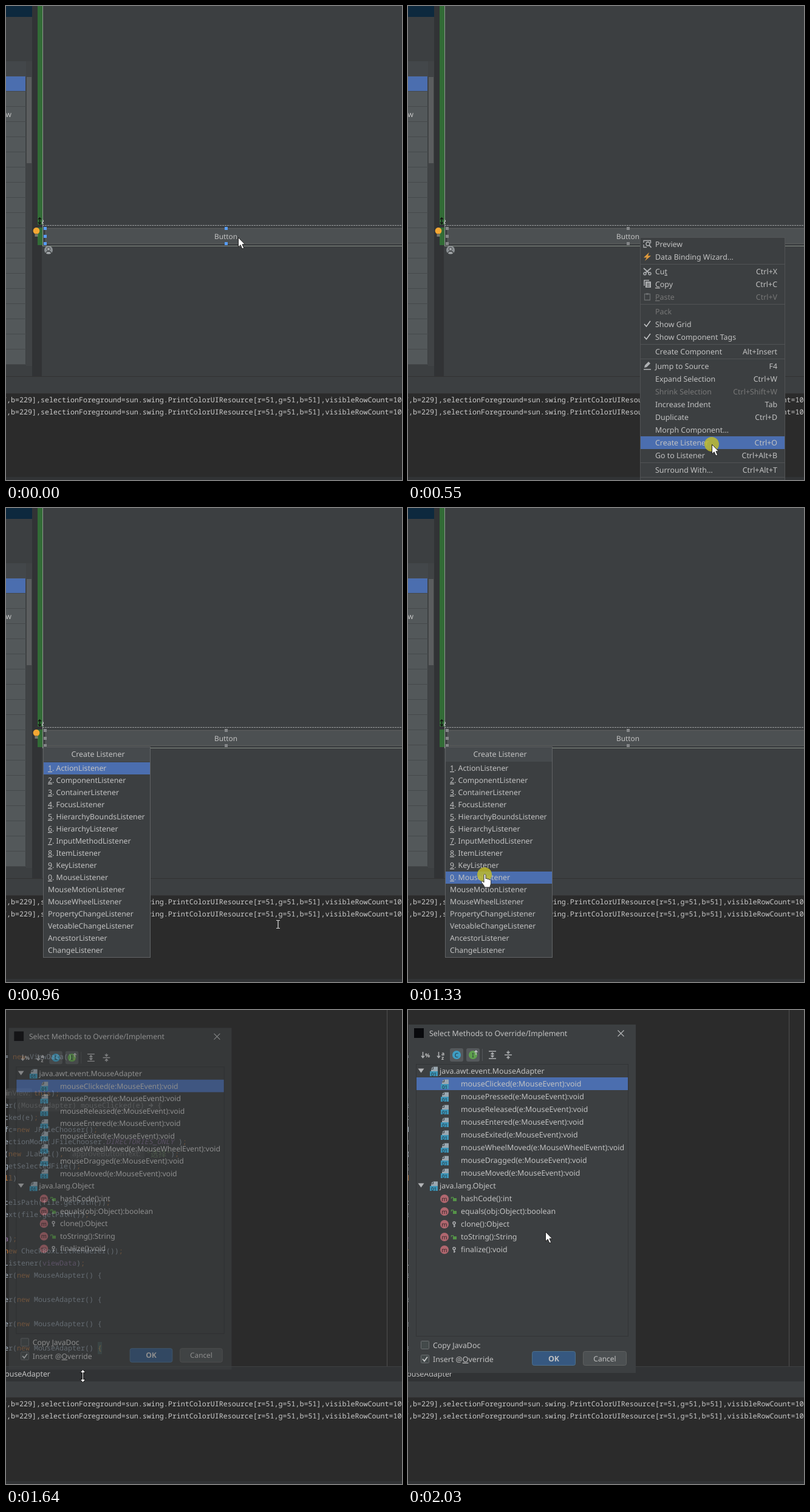
Write an HTML page that moves like this. It is 652x781 px and loops after 2110 ms.

```html
<!DOCTYPE html>
<html lang="en">
<head>
<meta charset="utf-8">
<title>Create listener</title>
<style>
  html, body { margin: 0; width: 100%; height: 100%; overflow: hidden; background: #3c3f41; }
  svg { display: block; }
  text { font: 12.4px "Noto Sans", "Open Sans", sans-serif; fill: #c2c2c2; white-space: pre; text-rendering: geometricPrecision; }
  text.code { font: 11.67px "Noto Sans Mono", "DejaVu Sans Mono", monospace; fill: #b0becd; }
  text.cjk { font: 13px "Noto Sans CJK SC", "Noto Sans CJK", sans-serif; fill: #6a8759; }
  .u { text-decoration: underline; }
</style>
</head>
<body>
<svg id="stage" width="652" height="781" viewBox="0 0 652 781"></svg>
<script>
const LOOP = 2110;
const BG = '#3c3f41', DARK = '#2b2b2b', BLUE = '#4b6eaf', GREY = '#afb1b3';

function el(tag, attrs, parent) {
  const e = document.createElementNS('http://www.w3.org/2000/svg', tag);
  for (const k in attrs) e.setAttribute(k, attrs[k]);
  parent.appendChild(e);
  return e;
}
const group = (parent = stage) => el('g', {}, parent);
const rect = (g, x, y, width, height, fill, more = {}) => el('rect', { x, y, width, height, fill, ...more }, g);
const frame = (g, x, y, w, h, fill, stroke, rx = 0) => rect(g, x + .5, y + .5, w - 1, h - 1, fill, { stroke, rx });
const path = (g, d, stroke, fill = 'none', width = 1.3) => el('path', { d, stroke, fill, 'stroke-width': width }, g);
const disc = (g, cx, cy, r, fill) => el('circle', { cx, cy, r, fill }, g);
const at = (g, x, y) => el('g', { transform: `translate(${x} ${y})` }, g);

// "_" marks the underlined mnemonic; y is the middle of the line
function label(g, x, y, str, style = '', anchor = 'start') {
  const t = el('text', { x, y: y + 4.5, style, 'text-anchor': anchor }, g);
  str.split(/(_.)/).forEach(part => {
    const key = part[0] === '_';
    if (part) el('tspan', key ? { class: 'u' } : {}, t).textContent = key ? part[1] : part;
  });
  return t;
}

const TOKENS = /(\bnew\b|\bthis\b|^ll|[;,]|DIRECTORIES_ONLY|viewData|^a\b)/;
function code(g, x, y, str, plain) {
  const t = el('text', { x, y: y + 4, class: 'code' }, g);
  if (plain) { t.style.fill = plain; t.textContent = str; return; }
  str.split(TOKENS).forEach((part, i) => {
    if (!part) return;
    const s = el('tspan', {}, t);
    s.textContent = part;
    if (i % 2) s.style.fill = /^(a|viewData|DIR.*)$/.test(part) ? '#9876aa' : '#cc7832';
    if (part.startsWith('DIR')) s.style.fontStyle = 'italic';
  });
}

// ---- form designer ----
const design = group();
rect(design, 0, 0, 652, 781, BG);
rect(design, 0, 0, 43, 18, '#0d293e');
rect(design, 0, 91, 33, 24, '#43474a');
rect(design, 33, 91, 10, 502, '#404345');
for (let i = 0; i < 19; i++) {
  rect(design, 0, 115 + 25 * i, 33, 1, '#45494b');
  rect(design, 0, 116 + 25 * i, 32, 24, i ? '#53585a' : BLUE);
}
rect(design, 0, 590, 33, 1, '#45494b');
rect(design, 34, 117, 8, 142, '#5b5d5e');
label(design, 9, 178.5, 'w', '', 'end');
rect(design, 43, 0, 16, 610, '#313335');
rect(design, 52, 0, 8, 360, '#326b36');
rect(design, 52, 365, 8, 29, '#326b36');
rect(design, 60, 0, 1, 395, '#8d9a8e');
path(design, 'M60 361.5H652', '#9a9c9d', 'none', 1).setAttribute('stroke-dasharray', '3 1');
rect(design, 60, 395, 592, 1, '#858d84');
frame(design, 65, 366, 600, 26, '#4c5052', '#5e6060', 2);
label(design, 362, 379.5, 'Button', 'font-size:11.8px', 'middle');
path(design, 'M55.5 349v10M53 351.5l2.5-2.5 2.5 2.5M53 356.5l2.5 2.5 2.5-2.5', '#111');
path(design, 'M59.5 353h2v2.5h-2v3h2.5', '#b5b8ba', 'none', 1);
const head = at(design, 70, 402);
disc(head, 0, 0, 7, '#8b9093');
path(head, 'M-4.5 6C-4.5 1 4.5 1 4.5 6', BG, '#a6aaac');
el('circle', { cx: 0, cy: -1.5, r: 2.7, fill: '#a6aaac', stroke: BG }, head);
const bulb = at(design, 50, 371);
path(bulb, 'M-2.5 4.5C-7.5 1-5.5-6 0-6S7.5 1 2.5 4.5z', 'none', '#f3a733');
path(bulb, 'M-2.5 6H2.5M-2.5 8H2.5', '#b9b9a8', 'none', 1);
const handles = group(design);
[[64, 366], [362, 366], [64, 379], [64, 391], [362, 391]].forEach(([x, y]) => rect(handles, x - 2, y - 2, 5, 5, 'currentColor'));
rect(design, 0, 610, 652, 1, '#323232');

// ---- code editor ----
const editor = group();
rect(editor, 0, 0, 652, 781, DARK);
rect(editor, 627, 0, 1, 587, '#505050');
rect(editor, 0, 129, 43, 17, '#3b3b3b', { rx: 3 });
label(editor, 40, 136, 'mainView:', 'font-size:12px;fill:#787878', 'end');
rect(editor, 18, 147, 238, 20, '#3a3a3a');
rect(editor, 105, 228, 123, 17, '#3b3b3b', { rx: 3 });
label(editor, 109, 236, 'approveButtonText:', 'font-size:12.2px;fill:#787878');
rect(editor, 151, 547, 7, 20, '#3b514d');
const lines = {
  77: '= new ViewData();', 157: 'er(', 177: 'cked(e);', 197: 'fc=new JFileChooser();',
  217: 'ectionMode(JFileChooser.DIRECTORIES_ONLY );', 237: '(new JLabel(),', 257: 'getSelectedFile();',
  277: 'll)', 317: 'celsPath(file.getPath());', 337: 'ext(file.getPath());', 377: 'a);',
  397: 'new CheckBoxListRenderer());', 417: 'Listener(viewData);'
};
for (const y in lines) code(editor, -3, +y, lines[y]);
[437, 477, 517, 557].forEach(y => code(editor, -3, y, 'er(new MouseAdapter() ' + (y < 557 ? '{' : '')));
code(editor, 151, 557, '{', '#d0a04c');
code(editor, 46, 137, 'this);');
code(editor, 18, 157, '(MouseAdapter) mouseClicked(e)', '#8c8c8c');
path(editor, 'M235 157h6M238.5 154l3 3-3 3', '#8c8c8c');
code(editor, 249, 157, '{', '#8c8c8c');
code(editor, 231, 237, '"', '#6a8759');
el('text', { x: 238, y: 241.5, class: 'cjk' }, editor).textContent = '选择';
code(editor, 264, 237, '"', '#6a8759');
code(editor, 271, 237, ');');
rect(editor, 0, 587, 652, 25, '#313335');
rect(editor, 0, 587, 652, 1, '#3e4042');
label(editor, 73, 599.5, 'MouseAdapter', '', 'end');
rect(editor, 0, 612, 652, 26, BG);

// ---- console ----
const out = group();
rect(out, 0, 638, 652, 143, DARK);
rect(out, 0, 638, 652, 1, '#323232');
rect(out, 0, 776, 652, 5, '#313335');
[649, 669].forEach(y => code(out, -6, y,
  '7,b=229],selectionForeground=sun.swing.PrintColorUIResource[r=51,g=51,b=51],visibleRowCount=10', '#cbcbcb'));

// ---- context menu ----
const menu = group();
frame(menu, 382, 381, 239, 420, BG, '#515355');
const menuBar = rect(menu, 383, 0, 237, 21, BLUE);
const menuRows = [];
const items = [
  'Preview', 'Data Binding Wizard...', '-', 'Cu_t|Ctrl+X', '_Copy|Ctrl+C', '!_Paste|Ctrl+V', '-',
  '!Pack', 'Show Grid', 'Show Component Tags', '-', 'Create Component|Alt+Insert', '-',
  'Jump to Source|F4', 'Expand Selection|Ctrl+W', '!Shrink Selection|Ctrl+Shift+W', 'Increase Indent|Tab',
  'Duplicate|Ctrl+D', 'Morph Component...', 'Create Listener|Ctrl+O', 'Go to Listener|Ctrl+Alt+B', '-',
  'Surround With...|Ctrl+Alt+T', '-'
];
let rowY = 382;
items.forEach(item => {
  if (item === '-') { rect(menu, 383, rowY + 1, 237, 1, '#515355'); rowY += 3; return; }
  const off = item[0] === '!', style = off ? 'fill:#777' : '';
  const [name, keys] = item.replace('!', '').split('|');
  label(menu, 407, rowY + 10.5, name, style);
  if (keys) label(menu, 608, rowY + 10.5, keys, style, 'end');
  if (!off) menuRows.push(rowY);
  rowY += 21;
});
let ic = at(menu, 394, 392);
path(ic, 'M-6-2v-3.5H5.5V-1M-6 1V5.5H-1', GREY);
el('circle', { cx: 1, cy: 0, r: 3, fill: 'none', stroke: GREY, 'stroke-width': 1.4 }, ic);
path(ic, 'M3 2l3.5 4', GREY, 'none', 1.8);
path(at(menu, 394, 413), 'M3-7L-6 1.5H-1L-4 7 6-1.5H1z', 'none', '#e09a3c');
ic = at(menu, 394, 437);
path(ic, 'M-6-5L3 3M-6 5L6-5', GREY, 'none', 1.7);
[-4, 4].forEach(x => el('circle', { cx: x, cy: 4, r: 2, fill: BG, stroke: GREY, 'stroke-width': 1.4 }, ic));
ic = at(menu, 394, 458);
path(ic, 'M-5 3V-6H3', GREY, 'none', 1.6);
rect(ic, -3, -4, 9, 10, GREY);
path(ic, 'M-1-1H4M-1 1.5H4M-1 4H4', BG, 'none', 1);
ic = at(menu, 394, 479);
path(ic, 'M-4.5-4.5h9v10h-9z', '#696c6e');
rect(ic, -2, -6, 4, 3, '#696c6e');
[524, 545].forEach(y => path(at(menu, 394, y), 'M-5 0l3.5 4L5-5', '#c5c7c8', 'none', 1.5));
ic = at(menu, 394, 593);
path(ic, 'M-5 3l1-4L2-7 5-4-1 2z', 'none', GREY);
rect(ic, -6, 5, 12, 1.5, GREY);

// ---- listener list ----
const list = group();
frame(list, 61, 393, 177, 348, BG, '#616365');
rect(list, 62, 394, 175, 24, '#464a4d');
label(list, 151.5, 405.5, 'Create Listener', '', 'middle');
const listBar = rect(list, 62, 419, 175, 20, BLUE);
['Action', 'Component', 'Container', 'Focus', 'HierarchyBounds', 'Hierarchy', 'InputMethod', 'Item', 'Key', 'Mouse',
  'MouseMotion', 'MouseWheel', 'PropertyChange', 'VetoableChange', 'Ancestor', 'Change'].forEach((name, i) =>
  label(list, 69, 428.5 + 20 * i, (i < 10 ? `_${(i + 1) % 10}. ` : '') + name + 'Listener', 'font-size:12.3px'));

// ---- method dialog ----
const dialog = group();
rect(dialog, 1, 24, 374, 574, BG);
rect(dialog, 10, 30, 16, 16, '#08090c');
label(dialog, 35, 38.5, 'Select Methods to Override/Implement');
path(dialog, 'M345.5 33.5l10 10M355.5 33.5l-10 10', '#b8babb', 'none', 1.1);

[28, 54].forEach((x, i) => {
  const g = at(dialog, x, 74);
  path(g, 'M-3.5-5V4M-6 1.5l2.5 3 2.5-3', GREY, 'none', 1.5);
  if (i) {
    label(g, 1, -3.5, 'a', 'font-size:8.5px;font-weight:700');
    label(g, 1, 3, 'z', 'font-size:8.5px;font-weight:700');
  } else label(g, 0, -1, '%', 'font-size:9px;font-weight:700');
});
[[80, 'C', '#3e9ec4'], [107, 'I', '#5fa04e']].forEach(([x, ch, fill]) => {
  rect(dialog, x - 11, 63, 22, 22, '#55595c', { rx: 3 });
  disc(dialog, x, 74, 7, fill);
  label(dialog, x, 73.5, ch, 'font-size:10px;fill:#273238', 'middle');
});
path(dialog, 'M112 74v-7M109.5 69.5l2.5-2.5 2.5 2.5', '#c0c4c6');
rect(dialog, 122, 64, 1, 20, '#54575a');
path(dialog, 'M133 68H145M133 80H145M139 70.5v7M136.5 73l2.5-2.5 2.5 2.5M136.5 75l2.5 2.5 2.5-2.5', GREY, 'none', 1.4);
path(dialog, 'M159 74H171M165 67v4.5M162.5 69l2.5 2.5 2.5-2.5M165 81v-4.5M162.5 79l2.5-2.5 2.5 2.5', GREY, 'none', 1.4);

frame(dialog, 13, 89, 350, 449, BG, '#323436');
rect(dialog, 14, 111, 348, 21, BLUE);
function classIcon(x, y) {
  const g = at(dialog, x, y);
  path(g, 'M-5 0V-4L-2-7.5H6V0z', 'none', '#9aa7b0');
  path(g, 'M-5-3.5H-1.5V-7.5', BG, 'none', 1);
  rect(g, -7, 0, 13, 8, '#3d95b8');
  label(g, -.5, 3, '01', 'font-size:8px;fill:#1f2a30', 'middle');
}
function methodIcon(y, open) {
  disc(dialog, 60, y, 7, '#b0676f');
  label(dialog, 60, y - 1, 'm', 'font-size:10px;fill:#33272a', 'middle');
  const g = at(dialog, 75, y);
  if (open) {
    rect(g, -1, -1, 6, 5, '#559348');
    path(g, 'M-3.5 0v-2.5h3V0', '#559348', 'none', 1.2);
  } else {
    el('circle', { cx: 1, cy: -2, r: 2, fill: 'none', stroke: GREY, 'stroke-width': 1.5 }, g);
    path(g, 'M1 0v5M1 3h2', GREY, 'none', 1.5);
  }
}
['*java.awt.event.MouseAdapter', 'mouseClicked(e:MouseEvent)', 'mousePressed(e:MouseEvent)', 'mouseReleased(e:MouseEvent)',
  'mouseEntered(e:MouseEvent)', 'mouseExited(e:MouseEvent)', 'mouseWheelMoved(e:MouseWheelEvent)', 'mouseDragged(e:MouseEvent)',
  'mouseMoved(e:MouseEvent)', '*java.lang.Object', 'hashCode():int', 'equals(obj:Object):boolean', 'clone():Object',
  'toString():String', 'finalize():void'].forEach((name, i) => {
  const y = 100.5 + 21 * i, root = name[0] === '*';
  if (root) path(dialog, `M16.5 ${y - 4}h10l-5 7z`, 'none', '#b4b6b8');
  if (i < 10) classIcon(root ? 43 : 61, y + .5);
  else methodIcon(y + .5, i % 2 || i === 10);
  label(dialog, root ? 52 : 87, y, root ? name.slice(1) : i < 9 ? name + ':void' : name);
});
[[545, 'Copy _JavaDoc'], [568, 'Insert @_Override']].forEach(([y, name]) => {
  frame(dialog, 21, y, 14, 14, '#43494a', '#6b6f71', 1);
  label(dialog, 41, y + 7.5, name);
});
path(dialog, 'M24 575l3 3.5 5-7', '#c5c7c8', 'none', 1.8);
frame(dialog, 204, 562, 72, 24, '#365880', '#4c708c', 3);
label(dialog, 240, 574, 'OK', 'font-weight:700', 'middle');
frame(dialog, 288, 562, 72, 24, '#4c5052', '#5e6060', 3);
label(dialog, 324, 574, 'Cancel', 'font-size:12px', 'middle');

// ---- pointers ----
const click = disc(stage, 0, 0, 12, '#c2bd2a');
click.setAttribute('opacity', .82);
const pointers = {};
[['arrow', 'M.5.5V16l3.7-3.3L6.8 19l2.9-1.2-2.7-6H11.500z', '#222'],
 ['hand', 'M-1 1c0-2 3-2 3 0v6c1-1 3-.7 3 .7 1-.8 3-.4 3 1 1-.6 2.5 0 2.5 1.5V14c0 3-1.5 4-1.5 7H0c0-2-2-4-4.5-7.5-1.5-2.2.5-3.5 2-2L-1 13z', '#333'],
 ['resize', 'M.5-10.5l4.500 5H1.500V5.500H5L.5 10.500-4 5.500h3.500V-5.500H-4z', '#111']
].forEach(([name, d, stroke]) => path(pointers[name] = group(), d, stroke, '#fff', 1));
pointers.beam = group();
path(pointers.beam, 'M-3-6.5H-1L0-6 1-6.5H3M0-6V6M-3 6.5H-1L0 6 1 6.5H3', '#ddd', 'none', 1.2);

// time, scene, pointer, x, y, click, dialog opacity, dialog scale
const steps = [
  [0, 'idle', 'arrow', 382, 381],
  [80, 'idle', 'arrow', 382, 381, 1],
  [150, 'menu', 'arrow', 382, 381],
  [330, 'menu', 'arrow', 409, 458],
  [400, 'menu', 'arrow', 458, 600],
  [470, 'menu', 'arrow', 497, 711],
  [550, 'menu', 'arrow', 500, 722, 1],
  [720, 'list', 'beam', 501, 723],
  [960, 'list', 'beam', 448, 686],
  [1020, 'list', 'beam', 330, 652],
  [1100, 'list', 'hand', 206, 624],
  [1170, 'list', 'hand', 150, 609],
  [1250, 'list', 'hand', 126, 604],
  [1330, 'list', 'hand', 126, 604, 1],
  [1480, 'edit', 'resize', 126, 603],
  [1570, 'edit', 'resize', 126, 603, 0, .2, .955],
  [1640, 'edit', 'resize', 126, 603, 0, .65, .981],
  [1720, 'edit', 'resize', 126, 603, 0, .94, .996],
  [1800, 'edit', 'resize', 126, 603, 0, 1, 1],
  [1870, 'edit', 'arrow', 150, 565, 0, 1, 1],
  [1950, 'edit', 'arrow', 191, 491, 0, 1, 1],
  [2030, 'edit', 'arrow', 226, 365, 0, 1, 1]
];
const show = (node, on) => node.style.display = on ? '' : 'none';

let last;
function draw(ms) {
  const step = steps.findLast(s => s[0] <= ms);
  if (step === last) return;
  last = step;
  const [time, scene, pointer, x, y, pressed, alpha = 0, scale = 1] = step;
  show(design, scene !== 'edit');
  show(editor, scene === 'edit');
  show(menu, scene === 'menu');
  show(list, scene === 'list');
  show(bulb, time < 1250);
  handles.setAttribute('color', scene === 'idle' ? '#589df6' : '#858789');

  const row = menuRows.find(r => y >= r && y < r + 21);
  show(menuBar, row);
  if (row) menuBar.setAttribute('y', row);
  listBar.setAttribute('y', 419 + 20 * (pointer === 'hand' ? Math.floor((y - 419) / 20) : 0));

  show(dialog, alpha);
  dialog.setAttribute('opacity', alpha);
  dialog.setAttribute('transform', `translate(188 310.5) scale(${scale}) translate(-188 -310.5)`);

  show(click, pressed);
  click.setAttribute('cx', x);
  click.setAttribute('cy', y);
  for (const name in pointers) show(pointers[name], name === pointer);
  pointers[pointer].setAttribute('transform', `translate(${x} ${y})`);
}

const start = performance.now();
function tick() {
  draw((performance.now() - start) % LOOP);
  requestAnimationFrame(tick);
}
tick();
</script>
</body>
</html>
```
